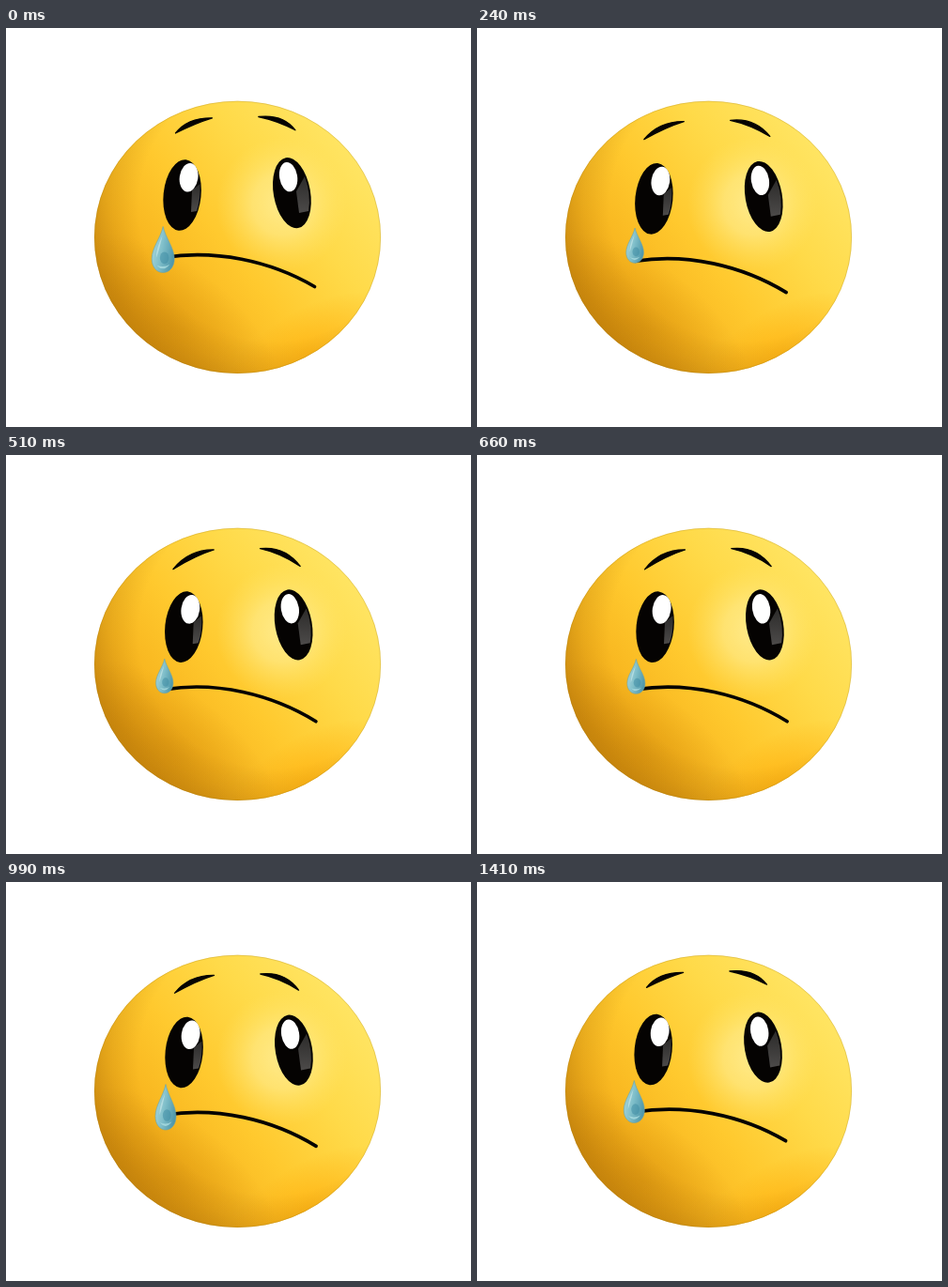
An HTML page for the animation above (1.44 s loop, 495 by 425 pixels).

```html
<!DOCTYPE html>
<html lang="en">
<head>
<meta charset="utf-8">
<title>Crying face</title>
<style>
  html, body { margin: 0; width: 100%; height: 100%; overflow: hidden; background: #fff; }
  svg { display: block; width: 495px; height: 425px; }
</style>
</head>
<body>
<svg viewBox="0 0 495 425">
  <defs>
    <linearGradient id="skin" gradientUnits="userSpaceOnUse" x1="372" y1="130" x2="138" y2="312">
      <stop offset="0" stop-color="#ffe564"/>
      <stop offset=".3" stop-color="#ffda49"/>
      <stop offset=".58" stop-color="#ffc92e"/>
      <stop offset=".82" stop-color="#f8b61f"/>
      <stop offset="1" stop-color="#eda416"/>
    </linearGradient>
    <radialGradient id="rim" gradientUnits="userSpaceOnUse" cx="285" cy="190" r="205">
      <stop offset=".7" stop-color="#8a5600" stop-opacity="0"/>
      <stop offset=".84" stop-color="#8a5600" stop-opacity=".14"/>
      <stop offset="1" stop-color="#8a5600" stop-opacity=".38"/>
    </radialGradient>
    <radialGradient id="shade">
      <stop offset="0" stop-color="#b87400" stop-opacity=".3"/>
      <stop offset=".5" stop-color="#b87400" stop-opacity=".17"/>
      <stop offset="1" stop-color="#b87400" stop-opacity="0"/>
    </radialGradient>
    <radialGradient id="warm">
      <stop offset="0" stop-color="#ffad0c" stop-opacity=".65"/>
      <stop offset="1" stop-color="#ffad0c" stop-opacity="0"/>
    </radialGradient>
    <radialGradient id="glow">
      <stop offset="0" stop-color="#fff0a0" stop-opacity=".75"/>
      <stop offset=".45" stop-color="#ffec90" stop-opacity=".6"/>
      <stop offset="1" stop-color="#ffe46a" stop-opacity="0"/>
    </radialGradient>
    <linearGradient id="water" x1="0" y1=".3" x2="1" y2=".7">
      <stop offset="0" stop-color="#a9d6da"/>
      <stop offset=".45" stop-color="#80bfca"/>
      <stop offset="1" stop-color="#4b94a8"/>
    </linearGradient>
    <linearGradient id="glint" x1="0" y1="0" x2="0" y2="1">
      <stop offset="0" stop-color="#2c2b2a"/>
      <stop offset="1" stop-color="#4c4a49"/>
    </linearGradient>
    <clipPath id="ball"><ellipse cx="246.5" cy="222.9" rx="152.5" ry="145.1"/></clipPath>
  </defs>

  <g clip-path="url(#ball)">
    <rect x="90" y="74" width="315" height="300" fill="url(#skin)"/>
    <ellipse cx="320" cy="350" rx="105" ry="48" fill="url(#warm)" transform="rotate(-32 320 350)"/>
    <ellipse cx="176" cy="318" rx="138" ry="66" fill="url(#shade)" transform="rotate(38 176 318)"/>
    <rect x="90" y="74" width="315" height="300" fill="url(#rim)"/>
    <ellipse cx="294" cy="188" rx="70" ry="72" fill="url(#glow)"/>
  </g>
  <ellipse cx="246.5" cy="222.9" rx="152.2" ry="144.8" fill="none" stroke="#9a7412" stroke-opacity=".35" stroke-width=".7"/>

  <g fill="#050302">
    <g id="eyes">
      <ellipse cx="187.6" cy="178" rx="20" ry="38" transform="rotate(6 187.6 178)"/>
      <path d="M198 173 L206.5 166 Q207 184 203 195 L197 196 Z" fill="url(#glint)"/>
      <ellipse cx="194.6" cy="159.2" rx="9.8" ry="15.4" fill="#fff" transform="rotate(8 194.6 159.2)"/>
      <ellipse cx="304.4" cy="175.7" rx="19.6" ry="38" transform="rotate(-10 304.4 175.7)"/>
      <path d="M309 174 L318 158 Q325 178 322 195 L312 197 Z" fill="url(#glint)"/>
      <ellipse cx="300.6" cy="158.6" rx="9.5" ry="15.8" fill="#fff" transform="rotate(-9 300.6 158.6)"/>
    </g>
    <g stroke="#050302" stroke-width="1.3" stroke-linejoin="round">
      <path id="browL"/>
      <path id="browR"/>
    </g>
    <path id="mouth" fill="none" stroke="#050302" stroke-width="3.7" stroke-linecap="round"/>
  </g>

  <g id="tear">
    <path d="M0 0 C.1 .24 .5 .46 .5 .7 C.5 .88 .28 1 0 1 C-.28 1 -.5 .88 -.5 .7 C-.5 .46 -.1 .24 0 0Z"
      fill="url(#water)" stroke="#6aa3ab" stroke-opacity=".6" stroke-width="1" vector-effect="non-scaling-stroke"/>
    <ellipse cx=".06" cy=".68" rx=".2" ry=".13" fill="#3b8aa2" opacity=".5"/>
    <path d="M-.03 .2 Q-.32 .48 -.3 .68 Q-.16 .5 -.03 .2Z" fill="#d3eff0" opacity=".55"/>
    <path d="M-.28 .84 Q0 1 .3 .82 Q.02 .9 -.28 .84Z" fill="#b4e2e6" opacity=".7"/>
  </g>
</svg>
<script>
const LOOP = 1440, STEP = 30;
const times = [0, 120, 360, 660, 990, 1230, 1410];
const tracks = {
  dx:      [0, .4, 1.2, 2, 2, .8, .1],
  dy:      [0, 1.8, 5, 5.2, 3.5, 1, .5],
  browX:   [0, -2, -3, -2, -1, 0, 0],
  browY:   [0, 3, 9, 9.8, 6.3, 1.5, .3],
  mouthY:  [0, 3, 8, 8.3, 5.8, 1.2, .2],
  tearX:   [167.2, 168, 168.2, 169.4, 170, 167.8, 167.3],
  tearTop: [211.5, 210, 216.5, 217.5, 215.5, 213, 211.5],
  tearEnd: [260.5, 248, 253, 254.3, 264, 256, 256.5],
  tearW:   [24, 20, 18, 19, 22, 21, 22]
};
const $ = id => document.getElementById(id);
const eyes = $('eyes'), browL = $('browL'), browR = $('browR'), mouth = $('mouth'), tear = $('tear');

// Cyclic cubic through the key values; slopes vanish at extremes.
function sample(v, t) {
  const n = times.length;
  const at = i => v[(i + n) % n];
  const when = i => times[(i + n) % n] + Math.floor(i / n) * LOOP;
  const rate = i => (at(i + 1) - at(i)) / (when(i + 1) - when(i));
  const slope = i => {
    const a = rate(i - 1), b = rate(i);
    return a * b <= 0 ? 0 : 2 * a * b / (a + b);
  };
  let i = n - 1;
  while (times[i] > t) i--;
  const h = when(i + 1) - when(i), u = (t - times[i]) / h, w = 1 - u;
  return at(i) * w * w * (1 + 2 * u) + at(i + 1) * u * u * (3 - 2 * u)
    + h * u * w * (slope(i) * w - slope(i + 1) * u);
}

function draw(t) {
  const p = {};
  for (const k in tracks) p[k] = sample(tracks[k], t);
  const { dx, dy, browX, browY, mouthY } = p;

  eyes.setAttribute('transform', `translate(${dx} ${dy})`);

  const la = `${180.5 + browX} ${112 + browY}`, lb = `${219.5 + dx} ${95.8 + dy}`;
  browL.setAttribute('d',
    `M${la} Q${193 + dx} ${95.5 + dy} ${lb} Q${201 + dx} ${101.5 + dy} ${la}Z`);

  const ra = `${268.8 + dx} ${94.5 + dy}`, rb = `${308 + dy} ${108.8 + browY}`;
  browR.setAttribute('d',
    `M${ra} Q${295 + dx} ${91.5 + dy} ${rb} Q${290 + dx} ${99 + dy} ${ra}Z`);

  mouth.setAttribute('d',
    `M${168 + dx} ${244.5 + dy} C${222 + dx} ${235.8 + dy} ${281 + dx} ${247.6 + mouthY * .85} ${328.5 + dx * .8} ${275.5 + mouthY}`);

  tear.setAttribute('transform',
    `translate(${p.tearX} ${p.tearTop}) scale(${p.tearW} ${p.tearEnd - p.tearTop})`);
}

const start = performance.now();
function tick() {
  const t = (performance.now() - start) % LOOP;
  draw(Math.floor(t / STEP) * STEP);
  requestAnimationFrame(tick);
}
draw(0);
requestAnimationFrame(tick);
</script>
</body>
</html>
```
